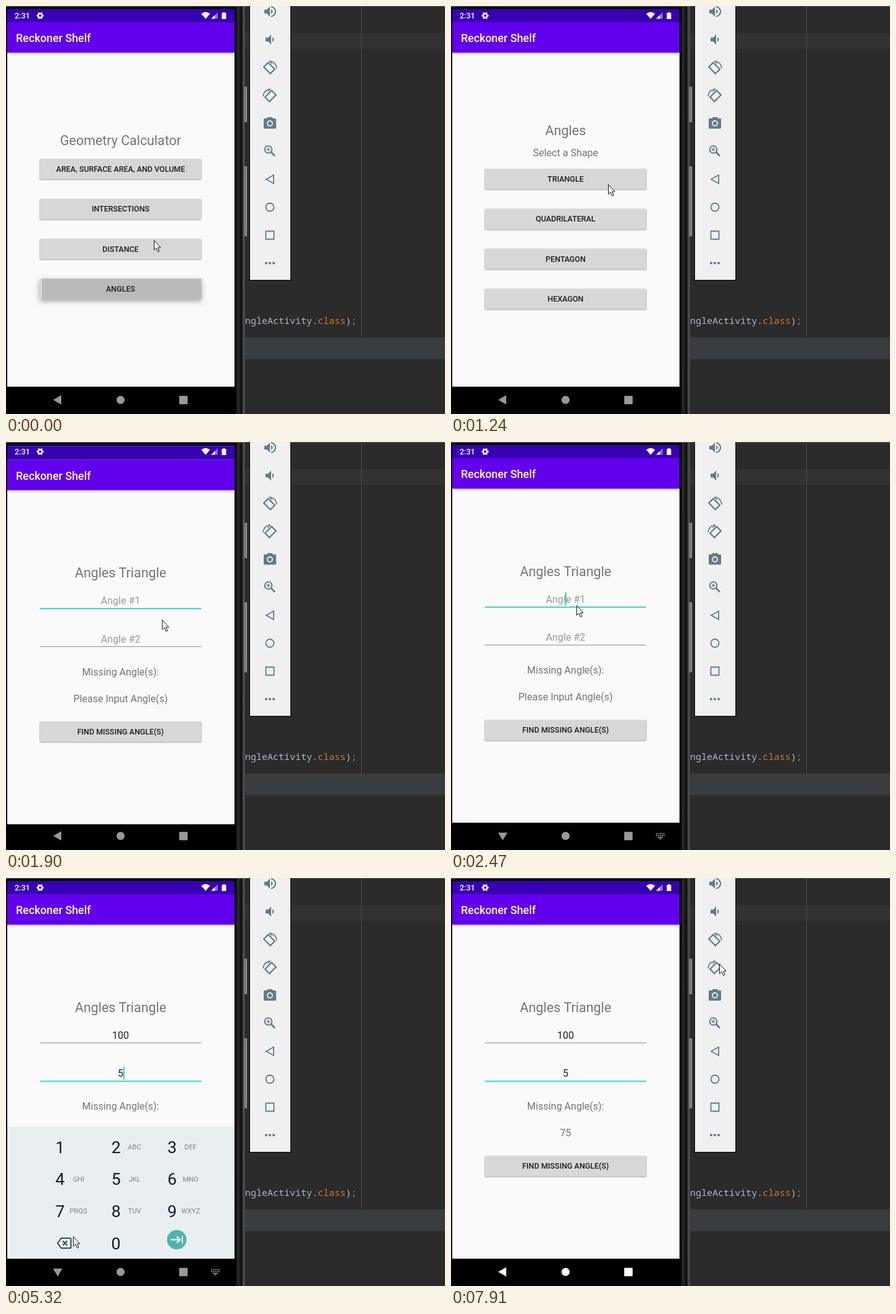
These frames come from a looping animation (707 px wide and 657 px high, 8000 ms). An HTML page with a canvas:

```html
<!DOCTYPE html>
<html lang="en">
<head>
<meta charset="utf-8">
<title>Geometry app demo</title>
<style>
html, body { margin: 0; width: 707px; height: 657px; overflow: hidden; background: #2b2b2b; }
canvas { display: block; }
</style>
</head>
<body>
<canvas id="stage" width="707" height="657"></canvas>
<script>
const ctx = document.getElementById('stage').getContext('2d');
const LOOP = 8000, MID = 184.5, TEAL = '#1ad1ba', GREY = '#757575', SLATE = '#5f7d8b';

const bursts = [[0, 0, 1], [160, 1110, 8], [1240, 2170, 8], [2320, 3310, 8], [3810, 3810, 1],
  [4090, 4330, 3], [4790, 5720, 7], [6000, 6950, 8], [7510, 7510, 1], [7910, 7910, 1]];
// Pointer glides: start, end, target x and y
const glides = [[0, 430, 302, 237], [430, 1240, 253, 287], [1700, 2320, 202, 263],
  [2500, 2740, 203, 296], [4700, 5250, 108, 577], [5250, 5720, 83, 636],
  [6000, 6270, 220, 481], [6400, 6950, 412, 349], [7900, 7910, 432, 138]];
const caretRestarts = [0, 2320, 3310, 4090, 4250, 6940];

const clamp = v => Math.max(0, Math.min(1, v));
const within = (t, a, b) => t >= a && t < b;

function lastUpdate(t) {
  const [a, b, n] = bursts.findLast(k => k[0] <= t);
  const gap = (b - a) / (n - 1) || 1;
  return a + gap * Math.min(n - 1, Math.floor((t - a + 3) / gap));
}
function pointerAt(t) {
  let x = 238, y = 377;
  for (const [a, b, toX, toY] of glides) {
    const u = clamp((t - a) / (b - a)), k = u * u * (3 - 2 * u);
    x += (toX - x) * k;
    y += (toY - y) * k;
  }
  return [x, y];
}
function progress(t, start) {
  const rest = Math.exp(-Math.max(0, t - start) / 58);
  return rest < .003 ? 1 : 1 - rest;
}
function caretOn(t) {
  return Math.floor((t - caretRestarts.findLast(r => r <= t)) / 500) % 2 === 0;
}

function rect(x, y, w, h, color) {
  ctx.fillStyle = color;
  ctx.fillRect(x, y, w, h);
}
function roundRect(x, y, w, h, r, color) {
  ctx.fillStyle = color;
  ctx.beginPath();
  ctx.roundRect(x, y, w, h, r);
  ctx.fill();
}
function text(s, x, mid, size, color, weight = 400, align = 'center') {
  ctx.font = `${weight} ${size}px Roboto, sans-serif`;
  ctx.textAlign = align;
  ctx.fillStyle = color;
  ctx.fillText(s, x, mid + size * .356);
}
function disc(x, y, r, color) {
  ctx.fillStyle = color;
  ctx.beginPath();
  ctx.arc(x, y, r, 0, 7);
  ctx.fill();
}
function ring(x, y, r, color, width) {
  ctx.strokeStyle = color;
  ctx.lineWidth = width;
  ctx.beginPath();
  ctx.arc(x, y, r, 0, 7);
  ctx.stroke();
}
function shape(d, x, y, fill, stroke, width = 1, turn = 0) {
  const path = new Path2D(d);
  ctx.save();
  ctx.translate(x, y);
  ctx.rotate(turn);
  if (fill) { ctx.fillStyle = fill; ctx.fill(path); }
  if (stroke) { ctx.strokeStyle = stroke; ctx.lineWidth = width; ctx.stroke(path); }
  ctx.restore();
}
function shaded(blur, dy, alpha, draw) {
  ctx.save();
  ctx.shadowColor = `rgba(0,0,0,${alpha})`;
  ctx.shadowBlur = blur;
  ctx.shadowOffsetY = dy;
  draw();
  ctx.restore();
}
function button(label, mid, pressed) {
  const top = mid - 16.5, box = () => roundRect(54.3, top, 260.4, 33, 2, '#d6d7d7');
  if (pressed) shaded(8, 3, .35, box);
  else shaded(2, 1, .35, box);
  if (pressed) rect(58, top, 256.7, 33, '#bababa');
  text(label, MID, mid, 12.46, '#1d1d1d', 500);
}
function field(hint, content, mid, focused, caret) {
  const under = mid + 12;
  text(content || hint, MID, mid, 16, content ? '#212121' : '#9a9a9a');
  rect(54.5, under, 260, focused ? 1.7 : 1, focused ? TEAL : '#8c8c8c');
  if (focused && caret) {
    const x = content ? MID + ctx.measureText(content).width / 2 : 184;
    rect(x, mid - 11, 1.8, 21, TEAL);
  }
}
function buttons(labels, firstMid, pressed) {
  labels.forEach((s, i) => button(s, firstMid + i * 64.4, i === pressed));
}

const pages = {
  home() {
    text('Geometry Calculator', MID, 216, 21.4, GREY);
    buttons(['AREA, SURFACE AREA, AND VOLUME', 'INTERSECTIONS', 'DISTANCE', 'ANGLES'], 262.5, 3);
  },
  angles(t) {
    text('Angles', MID, 200, 21.4, GREY);
    text('Select a Shape', MID, 236, 16, GREY);
    buttons(['TRIANGLE', 'QUADRILATERAL', 'PENTAGON', 'HEXAGON'], 278.5, within(t, 1300, 1600) ? 0 : -1);
  },
  triangle(t) {
    const first = t < 4090, caret = caretOn(t);
    const typed = '100'.slice(0, Math.max(0, Math.floor((t - 2700) / 200)));
    text('Angles Triangle', MID, 208, 21.4, GREY);
    field('Angle #1', typed, 253, first, caret);
    field('Angle #2', t < 4330 ? '' : '5', 314.5, !first, caret);
    text('Missing Angle(s):', MID, 367.5, 16, GREY);
    text(t < 6540 ? 'Please Input Angle(s)' : '75', MID, 410.5, 16, GREY);
    button('FIND MISSING ANGLE(S)', 464, within(t, 6400, 6600));
  }
};

function page(name, t, dy, hidden, dim) {
  ctx.save();
  ctx.beginPath();
  ctx.rect(2, Math.max(5, 5 + dy + 608 * hidden), 366, 660);
  ctx.clip();
  ctx.translate(0, dy);
  rect(2, 5, 366, 608, '#fafafa');
  shaded(4, 1, .4, () => rect(2, 26, 366, 49, '#6200ee'));
  rect(2, 0, 366, 26, '#3700b3');
  text('Reckoner Shelf', 16, 52, 17.8, '#fff', 500, 'left');
  pages[name](t);
  if (dim) rect(2, 0, 366, 613, `rgba(0,0,0,${dim})`);
  ctx.restore();
}
function opening(from, to, p, t) {
  if (p < 1) page(from, t, -3 * p, 0, Math.min(.1, .17 * p));
  if (p > 0) page(to, t, 39 * (1 - p), p > .9 ? 0 : 1 - p, 0);
}

function statusBar() {
  text('2:31', 14, 15.5, 12.5, '#fff', 500, 'left');
  ring(55, 15.5, 3.2, '#fff', 2.4);
  for (let i = 0; i < 6; i++) {
    shape('M-1.3-5.6h2.6v2.4h-2.6z', 55, 15.5, '#fff', null, 1, (i + .5) * Math.PI / 3);
  }
  shape('M0 10.5L-7 2.2Q0-3 7 2.2Z', 321.5, 10.2, '#fff');
  shape('M0 10.5L10.5 0V10.5Z', 330.5, 10, '#8a6ad0');
  shape('M0 10.5L6 4.5V10.5Z', 330.5, 10, '#fff');
  shape('M0 1.3H2V0H5V1.3H7V11H0Z', 347.5, 10, '#fff');
}

function navBar(t) {
  const typing = within(t, 2450, 6000), color = t < 6000 ? '#999' : '#fff';
  rect(0, 612, 368, 45, '#000');
  if (within(t, 6000, 6500)) roundRect(37.5, 613, 91, 43, 21, '#141414');
  if (typing) shape('M-7.5-5.5H7.5L0 7Z', 83.3, 634.5, color);
  else shape('M-7 0L6-7.5V7.5Z', 83, 634.3, color);
  disc(184.5, 634.3, 6.5, color);
  roundRect(279, 627.8, 13.5, 13.5, 1, color);
  if (typing) {
    for (let i = 0; i < 10; i++) rect(330 + i % 5 * 3, 630 + (i > 4) * 3, 1.8, 1.8, color);
    rect(333, 636, 8, 1.6, color);
    shape('M-2 0H2L0 2Z', 337, 638.5, color);
  }
}

function keypad(shown) {
  if (!shown) return;
  ctx.save();
  ctx.beginPath();
  ctx.rect(2, 380, 366, 233);
  ctx.clip();
  ctx.globalAlpha = shown;
  ctx.translate(0, 70 * (1 - shown));
  rect(2, 400, 366, 213, '#e9eef1');
  ['', 'ABC', 'DEF', 'GHI', 'JKL', 'MNO', 'PRQS', 'TUV', 'WXYZ'].forEach((s, i) => {
    const x = i % 3 * 90.3, y = 433 + Math.floor(i / 3) * 51.6;
    text(i + 1, 87 + x, y, 26.7, '#04202a');
    text(s, 116.7 + x, y, 11.2, '#7b858a');
  });
  text('0', 177, 588, 26.7, '#04202a');
  shape('M-11 0L-5-8H9Q10.5-8 10.5-6.5V6.5Q10.5 8 9 8H-5ZM-2.5-3.5L4.5 3.5M4.5-3.5L-2.5 3.5',
    94, 588, null, '#37474f', 2);
  disc(275, 582.5, 15.7, '#4db6ac');
  shape('M-10 0H5M0-5L5.5 0L0 5M9-6V6', 275, 582.5, null, '#fff', 2);
  ctx.restore();
}

function editor() {
  rect(0, 0, 707, 657, '#2b2b2b');
  rect(385, 44, 322, 25, '#323232');
  rect(385, 534, 322, 34.5, '#393d40');
  rect(572, 0, 1, 534, '#4b4b4b');
  rect(385, 0, 322, 1, '#555');
  ctx.font = '15px "Noto Sans Mono", monospace';
  ctx.textAlign = 'left';
  let x = 385;
  for (const s of ['ngleActivity.', 'class', ')', ';']) {
    ctx.fillStyle = s === 'class' || s === ';' ? '#cc7832' : '#a9b7c6';
    ctx.fillText(s, x, 512);
    x += s.length * 9;
  }
}

function phoneEdge() {
  const metal = ctx.createLinearGradient(368, 0, 385, 0);
  ['#000', '#0c0c0c', '#2c2c2c', '#1c1c1c', '#0a0a0a', '#4c4c4c', '#444']
    .forEach((c, i, all) => metal.addColorStop(i / (all.length - 1), c));
  rect(0, 0, 368, 657, '#000');
  rect(368, 0, 17, 657, metal);
  rect(0, 0, 385, 1, '#6a6a6a');
  for (const [y, h] of [[130, 57], [258, 113]]) {
    rect(383, y, 5, h, '#777');
    rect(387, y, 1, h, '#aaa');
  }
}

function toolbar() {
  const x = 425;
  rect(392, 0, 67, 442, '#000');
  rect(393, 0, 65, 441, '#f0f0f0');
  shape('M-9-3V3H-5L0 8V-8L-5-3ZM2-4V4Q4.5 2.5 4.5 0T2-4Z', x, 9, SLATE);
  shape('M2-8Q9-6 9 0T2 8', x, 9, null, SLATE, 2);
  shape('M-7-3V3H-3L2 8V-8L-3-3ZM4-4V4Q6.5 2.5 6.5 0T4-4Z', x, 54, SLATE);
  for (const side of [1, -1]) {
    ctx.save();
    ctx.translate(x, 121.5 - side * 22.5);
    ctx.scale(side, 1);
    shape('M-5-7.5H5V7.5H-5Z', -1, 1, null, SLATE, 2.2, -Math.PI / 4);
    shape('M-1-10.3Q9.5-10 11 1.5M-1-10.3L4-6', 0, 0, null, SLATE, 1.6);
    ctx.restore();
  }
  shape('M-3.5-9.5H3.5L5-7.5H8.5Q10-7.5 10-6V7.5Q10 9 8.5 9H-8.5Q-10 9-10 7.5V-6Q-10-7.5-8.5-7.5H-5Z',
    x, 188.5, SLATE);
  ring(x, 189, 4, '#f0f0f0', 1.8);
  ring(422.5, 231, 5.8, SLATE, 2);
  shape('M4 4L10.5 10.5', 422.5, 231, null, SLATE, 2.6);
  shape('M-3 0H3M0-3V3', 422.5, 231, null, SLATE, 1.4);
  shape('M-6 0L6-6.8V6.8Z', x, 279, null, SLATE, 1.8);
  ring(x, 324, 6.5, SLATE, 1.8);
  shape('M-6.5-6.5H6.5V6.5H-6.5Z', x, 369, null, SLATE, 1.8);
  for (const dx of [-6, 0, 6]) disc(x + dx, 414, 2.1, SLATE);
}

function draw(t) {
  editor();
  phoneEdge();
  navBar(t);
  if (t < 1240) opening('home', 'angles', progress(t, 243), t);
  else opening('angles', 'triangle', progress(t, 1612), t);
  keypad(clamp((t - 2520) / 200) - clamp((t - 5950) / 150));
  statusBar();
  toolbar();
  shape('M.5.5V16L4 12.8L6.6 18.8L9 17.7L6.5 12H11Z', ...pointerAt(t), '#fff', '#111');
}

const start = performance.now();
function tick() {
  draw(lastUpdate((performance.now() - start) % LOOP));
  requestAnimationFrame(tick);
}
tick();
</script>
</body>
</html>
```
